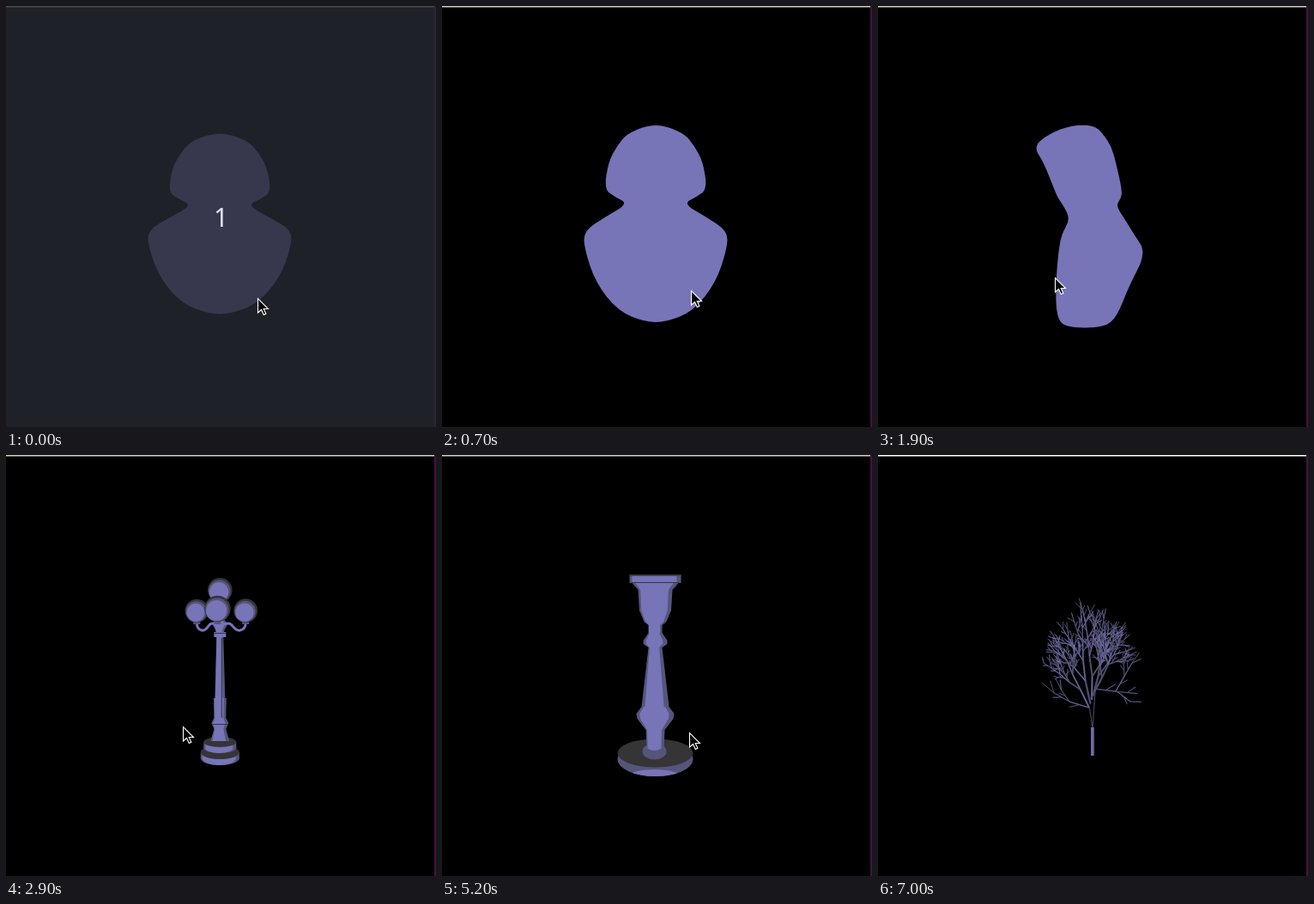
An HTML page with a canvas that plays this animation: 501 px wide and 490 px high, repeating every 7100 ms.

```html
<!DOCTYPE html>
<html lang="en">
<head>
<meta charset="utf-8">
<title>Model viewer</title>
<style>
  html, body { margin: 0; width: 100%; height: 100%; overflow: hidden; background: #000; }
  canvas { display: block; }
</style>
</head>
<body>
<canvas id="stage" width="501" height="490"></canvas>
<script>
const ctx = document.getElementById('stage').getContext('2d');
const LOOP = 7100, STEP = 100, TAU = Math.PI * 2;
const LIGHT = '#7774b8', MID = '#55557a', DARK = '#353537';

const mix = (a, b, k) => a + (b - a) * k;
const clamp = (v, low = 0, high = 1) => Math.min(high, Math.max(low, v));

// The pointer moves straight from stop to stop: time, x, y.
const pointerStops = [
  [0, 293, 340], [700, 290, 331], [1500, 237, 316], [1900, 206, 316], [3000, 206, 316],
  [3300, 210, 318], [3600, 204, 317], [3700, 204, 317], [4200, 248, 322], [5200, 288, 323],
  [5800, 322, 323], [6100, 322, 323], [6200, 192, 213], [6300, 192, 213], [6500, 28, 4],
  [6600, 28, 4], [6800, 40, -24]
];

function pointerAt(t) {
  const next = pointerStops.findIndex(stop => stop[0] > t);
  if (next < 0) return pointerStops.at(-1).slice(1);
  const [t0, x0, y0] = pointerStops[next - 1], [t1, x1, y1] = pointerStops[next];
  const k = (t - t0) / (t1 - t0);
  return [mix(x0, x1, k), mix(y0, y1, k)];
}

function fillPath(points, fill, smooth = false) {
  ctx.beginPath();
  points.forEach(([x, y], i) => {
    const [nx, ny] = points[(i + 1) % points.length];
    if (!smooth) ctx.lineTo(x, y);
    else if (i === 0) ctx.moveTo((x + nx) / 2, (y + ny) / 2);
    else ctx.quadraticCurveTo(x, y, (x + nx) / 2, (y + ny) / 2);
  });
  if (smooth) {
    const [a, b] = points;
    ctx.quadraticCurveTo(a[0], a[1], (a[0] + b[0]) / 2, (a[1] + b[1]) / 2);
  }
  ctx.closePath();
  ctx.fillStyle = fill;
  ctx.fill();
}

function ellipse(x, y, rx, ry, fill) {
  ctx.beginPath();
  ctx.ellipse(x, y, rx, ry, 0, 0, TAU);
  ctx.fillStyle = fill;
  ctx.fill();
}

function bar(x, y, halfWidth, height, fill) {
  ctx.fillStyle = fill;
  ctx.fillRect(x - halfWidth, y, halfWidth * 2, height);
}

// Symmetric solid from [y, half width] pairs, lit in the middle.
function turned(axis, pairs, lit) {
  const draw = (scale, shift, fill) => {
    const side = s => pairs.map(([y, w]) => [axis + shift + s * w * scale, y]);
    fillPath([...side(-1), ...side(1).reverse()], fill);
  };
  draw(1, 0, MID);
  draw(lit, -1, LIGHT);
}

// Each row: y, half width from the front, left and right edge from the side.
const bustRows = [
  [139, 10, -24, 4], [149, 34, -50, 18], [163, 45, -68, 31], [181, 55, -56, 38],
  [213, 60, -43, 48], [222, 48, -39, 46], [230, 32, -33, 38], [245, 58, -25, 52],
  [262, 84, -35, 66], [283, 83, -39, 86], [322, 70, -42, 58], [355, 44, -41, 40],
  [368, 12, -31, 20]
];

function drawBust(t, pointerX) {
  const pitch = mix(0.916, 1, clamp(t / 600));
  const turn = clamp((290 - pointerX) / 53);
  const narrow = mix(1, 0.74, clamp((237 - pointerX) / 31));
  const edge = s => bustRows.map(([y, front, left, right]) => {
    const x = mix(s * front, s < 0 ? left : right * narrow, turn);
    return [249 + x, 254 + (y - 254) * pitch + turn * (y - 150) * 0.03];
  });
  fillPath([...edge(-1), ...edge(1).reverse()], LIGHT, true);
}

function globe(x, y, r) {
  [DARK, MID, LIGHT].forEach((fill, i) => ellipse(x - i * 0.6, y + i, r - i * 1.6, r - i * 1.6, fill));
}

function drum(x, top, bottom, rx, ry) {
  ellipse(x, bottom, rx, ry, MID);
  bar(x, top, rx, bottom - top, MID);
  ellipse(x - 1, bottom, rx - 3, ry, LIGHT);
  bar(x - 1, top, rx - 3, bottom - top, LIGHT);
  ellipse(x, top, rx, ry, DARK);
}

function lampArm(axis, angle) {
  const sin = Math.sin(angle), depth = Math.cos(angle);
  const x = axis + 33 * sin, y = 180.5 - depth * 1.5;
  ctx.strokeStyle = depth > -0.6 ? LIGHT : MID;
  ctx.lineWidth = 3;
  ctx.beginPath();
  ctx.moveTo(axis + 5 * sin, 197);
  ctx.bezierCurveTo(axis + 18 * sin, 192, axis + 16 * sin, 206, axis + 26 * sin, 204);
  ctx.quadraticCurveTo(x, 203, x, 195);
  ctx.stroke();
  bar(x, 193, 4, 4, MID);
  globe(x, y, 14.3 + depth);
}

function drawLamp(t, pointerX) {
  const drag = t < 3500 ? 0 : pointerX - 210;
  const axis = 249.3 - drag * 0.17;
  const arms = [-5, 115, 235].map(a => (a + drag * 1.3) * TAU / 360);
  const isBehind = a => Math.cos(a) < -0.6;

  drum(axis, 346, 353, 22.5, 8);
  drum(axis, 334, 341, 19, 6);
  arms.filter(isBehind).forEach(a => lampArm(axis, a));
  turned(axis, [[170, 3], [190, 4], [197, 9], [204, 5], [213, 4], [283, 6]], 0.72);
  turned(axis, [[283, 7.5], [306, 7], [312, 10], [319, 7], [333, 11]], 0.72);
  bar(axis, 206, 7, 6, LIGHT);
  bar(axis, 207, 7, 1, DARK);
  bar(axis, 313, 9, 1, DARK);
  bar(axis + 2, 213, 0.5, 93, DARK);
  globe(axis, 157.3, 14.3);
  arms.filter(a => !isBehind(a))
    .sort((a, b) => Math.cos(a) - Math.cos(b))
    .forEach(a => lampArm(axis, a));
}

function drawCandlestick() {
  const x = 248.5;
  ellipse(x, 354, 44, 20, MID);
  ctx.save();
  ctx.clip();
  ellipse(x - 1, 373, 28, 7, LIGHT);
  ctx.restore();
  ellipse(x, 347, 44, 16.5, DARK);
  ellipse(x - 1, 345, 14, 9.5, MID);
  turned(x, [[149, 27], [157, 20], [181, 18.5], [194, 13], [198, 8], [207, 8]], 0.82);
  turned(x, [[207, 8], [216, 14], [220, 14], [224, 8], [293, 16]], 0.7);
  turned(x, [[293, 16], [301, 22], [307, 21], [320, 11], [342, 10]], 0.78);
  ellipse(x - 1, 340, 8, 4, LIGHT);
  bar(x, 139, 30, 10, MID);
  bar(x - 1, 141, 26, 7, LIGHT);
  bar(x, 139, 30, 1.5, DARK);
  bar(x, 148, 28, 1, DARK);
}

function growTree() {
  let seed = 29;
  const random = () => (seed = (seed * 16807) % 2147483647) / 2147483647;
  const around = spread => (random() - 0.5) * 2 * spread;
  const twigs = [];

  function grow(x, y, angle, length, depth) {
    const ex = x + Math.cos(angle) * length, ey = y + Math.sin(angle) * length;
    if (ex < 191 || ex > 307 || ey < 141) return;
    twigs.push({ x, y, ex, ey, depth, fill: random() < 0.45 ? LIGHT : MID });
    if (!depth) return;
    const ahead = mix(angle, -TAU / 4, 0.05);
    const side = random() < 0.5 ? -1 : 1;
    grow(ex, ey, ahead + around(0.17), length * 0.87, depth - 1);
    grow(ex, ey, ahead + side * (0.35 + random() * 0.4), length * 0.7, depth - 1);
    if (depth < 4) grow(mix(x, ex, 0.5), mix(y, ey, 0.5), ahead - side * 0.6, length * 0.5, depth - 2 > 0 ? 1 : 0);
  }

  grow(250, 350, -TAU / 4, 32, 0);
  grow(250, 318, -1.72, 24, 0);
  grow(250, 318, -1.5, 44, 0);
  // Leaders spread like a fan, the right ones reaching higher.
  for (let i = 0; i < 5; i++) {
    const k = i / 4;
    grow(mix(246, 252, k), mix(294, 276, k), mix(-2.02, -1.08, k), mix(23, 28, Math.sin(k * 4)), 5);
  }
  grow(246, 294, -2.85, 24, 2);
  grow(252, 272, 0.13, 27, 2);
  grow(277, 275, -1.05, 20, 2);
  return twigs;
}
const tree = growTree();

function drawTree() {
  const line = (twig, color, width) => {
    ctx.strokeStyle = color;
    ctx.lineWidth = width;
    ctx.beginPath();
    ctx.moveTo(twig.x, twig.y);
    ctx.lineTo(twig.ex, twig.ey);
    ctx.stroke();
  };
  tree.forEach(twig => line(twig, '#45445e', 0.8 + twig.depth * 0.3));
  tree.forEach(twig => line(twig, twig.fill, 0.6 + twig.depth * 0.06));
  bar(250, 317, 2, 33, MID);
  bar(249.5, 317, 1, 33, LIGHT);
}

function drawPointer(x, y) {
  const arrow = new Path2D('M0 0V16.5L4 13L6.8 19L9.4 17.8L6.7 12H12Z');
  ctx.save();
  ctx.translate(x + 0.5, y + 0.5);
  ctx.fillStyle = '#000';
  ctx.fill(arrow);
  ctx.strokeStyle = '#fff';
  ctx.lineWidth = 1.1;
  ctx.stroke(arrow);
  ctx.restore();
}

function drawCountdown() {
  ctx.fillStyle = 'rgba(39, 42, 51, 0.8)';
  ctx.fillRect(0, 0, 501, 490);
  ctx.fillStyle = '#dfe0f2';
  ctx.font = '30px "Noto Sans", sans-serif';
  ctx.textAlign = 'center';
  ctx.fillText('1', 250.5, 256.5);
}

function draw(t) {
  const [x, y] = pointerAt(t);
  ctx.fillStyle = '#000';
  ctx.fillRect(0, 0, 501, 490);
  ctx.fillStyle = '#481040';
  ctx.fillRect(499, 0, 2, 490);
  ctx.fillStyle = t < 7000 ? '#d4cfbf' : '#fff';
  ctx.fillRect(0, 0, 499, 1.5);

  if (t < 2900) drawBust(t, x);
  else if (t < 4500) drawLamp(t, x);
  else if (t < 5500) drawCandlestick();
  else drawTree();

  if (t < 100) drawCountdown();
  if (t < 6800) drawPointer(x, y);
}

const start = performance.now();
function tick() {
  const t = (performance.now() - start) % LOOP;
  draw(Math.floor(t / STEP) * STEP);
  requestAnimationFrame(tick);
}
tick();
</script>
</body>
</html>
```
